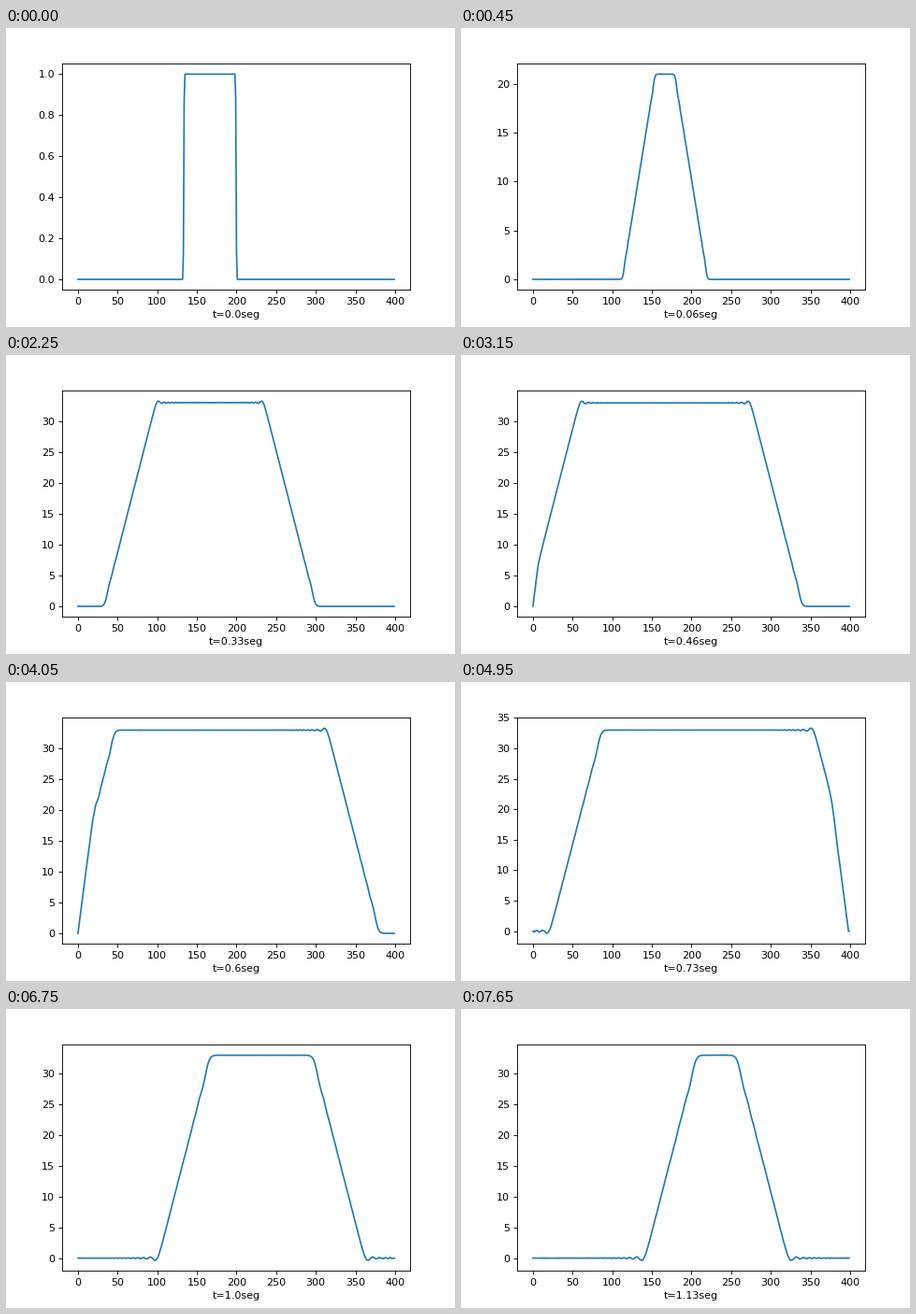
Animation of 480x320 px, one loop 8000 ms. Source, as a matplotlib script:

```python
import numpy as np
import matplotlib.pyplot as plt
from matplotlib.animation import FuncAnimation

N = 400                 # grid points
COURANT = 0.5
STEPS_PER_SHOT = 40     # solver steps between two pictures
SHOTS = 18
TICK = 50               # ms per animation frame
HOLD = 9                # animation frames per picture


def solve_wave():
    """Leapfrog wave equation with fixed ends, driven by a box-shaped kick."""
    i = np.arange(N)
    prev = np.zeros(N)
    cur = np.where((i > N / 3) & (i < N / 2), 0.5, 0.0)
    shots = []
    for step in range(STEPS_PER_SHOT * (SHOTS - 1) + 1):
        new = np.zeros(N)
        lap = cur[2:-1] - 2 * cur[1:-2] + cur[:-3]
        new[1:-2] = 2 * cur[1:-2] - prev[1:-2] + COURANT**2 * lap
        prev, cur = cur, new
        if step % STEPS_PER_SHOT == 0:
            shots.append(cur)
    return shots


def time_label(shot):
    hundredths = shot * 100 // 15
    return f"t={hundredths / 100}seg"


shots = solve_wave()

plt.rcParams["font.family"] = "DejaVu Sans"
plt.rcParams["font.size"] = 10
fig, ax = plt.subplots(figsize=(6, 4), dpi=80)
fig.subplots_adjust(left=0.125, right=0.9, bottom=0.125, top=0.88)
line, = ax.plot(shots[0], color="C0", lw=1.5)


def draw(frame):
    shot = frame // HOLD
    line.set_ydata(shots[shot])
    ax.relim()
    ax.autoscale_view()
    ax.set_xlabel(time_label(shot))
    return line,


anim = FuncAnimation(fig, draw, frames=8000 // TICK, interval=TICK,
                     init_func=lambda: draw(0), repeat=True, repeat_delay=0)
plt.show()
```
